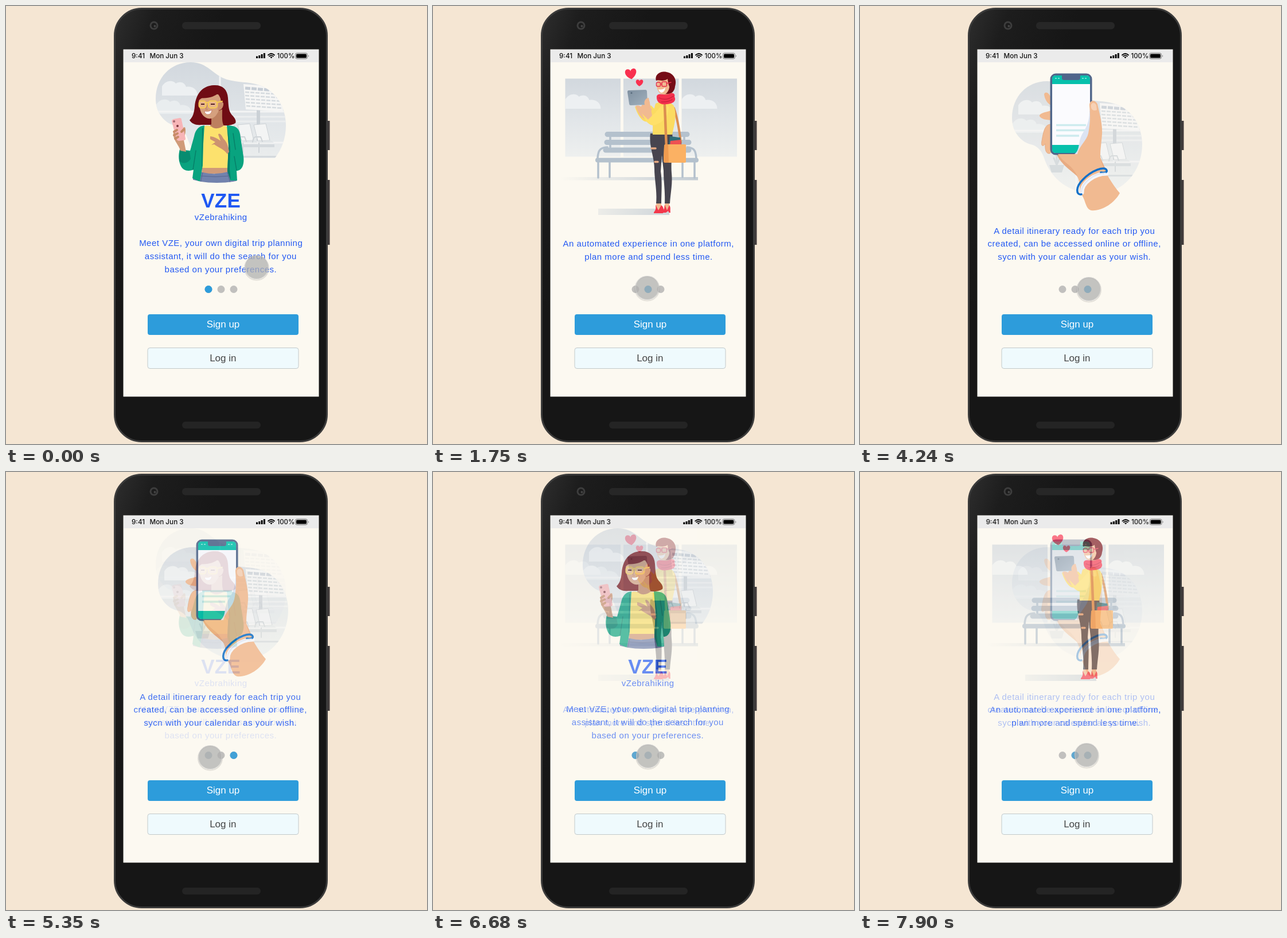
These frames come from a looping animation (734x763 px, 8 s). An HTML page:

```html
<!DOCTYPE html>
<html lang="en">
<head>
<meta charset="utf-8">
<title>Onboarding</title>
<style>
html, body { margin: 0; width: 100%; height: 100%; overflow: hidden; background: #f5e6d3; }
svg { display: block; width: 100%; height: 100%; }
text { font-family: "Liberation Sans", Arial, sans-serif; }
.copy { font-size: 15px; letter-spacing: .5px; fill: #2359f3; text-anchor: middle; }
.brand { font-size: 35px; font-weight: bold; letter-spacing: .3px; fill: #1f58f3; text-anchor: middle; }
.label { font-size: 17px; text-anchor: middle; }
.bar text { font: 450 11.7px Inter, sans-serif; fill: #111; }
.skin { fill: #d09a78; }
.peach { fill: #f1ba91; }
.line { fill: none; stroke-linecap: round; stroke-linejoin: round; }

#meet, #auto, #tip, #press { animation: 8s step-end infinite; }
#meet { animation-name: meet; }
#auto { animation-name: auto; }
#tip { animation-name: tip; }
#press { animation-name: press; }

@keyframes meet {
  0% { opacity: 1 }
  15.125% { opacity: .87 }
  16.625% { opacity: .65 }
  18% { opacity: .35 }
  19.375% { opacity: .12 }
  20.625% { opacity: .03 }
  21.875% { opacity: 0 }
  66.875% { opacity: .14 }
  68.25% { opacity: .4 }
  69.75% { opacity: .7 }
  71.25% { opacity: .94 }
  72.5% { opacity: .98 }
  73.75% { opacity: 1 }
  83.5% { opacity: .67 }
  85.25% { opacity: .35 }
  86.5% { opacity: .12 }
  87.75% { opacity: .03 }
  89% { opacity: 0 }
  100% { opacity: 0 }
}
@keyframes auto {
  0% { opacity: 1 }
  42.25% { opacity: .8 }
  43.875% { opacity: .4 }
  45.375% { opacity: .08 }
  47.75% { opacity: 0 }
  75% { opacity: 1 }
  96.875% { opacity: .88 }
  98.75%, 100% { opacity: .65 }
}
@keyframes tip {
  0% { transform: translate(437px, 455px) }
  1.25% { transform: translate(426px, 463px) }
  2.337% { transform: translate(402px, 481px) }
  3.412% { transform: translate(378px, 499px) }
  4.5% { transform: translate(371px, 505px) }
  6.625% { transform: translate(370px, 502px) }
  8.187% { transform: translate(372px, 494px) }
  9.75% { transform: translate(373.5px, 491px) }
  32.625% { transform: translate(387px, 491px) }
  34.125% { transform: translate(405px, 491.5px) }
  53% { transform: translate(399px, 493px) }
  54.5% { transform: translate(354px, 497px) }
  57.25% { transform: translate(356px, 497px) }
  73.75% { transform: translate(374px, 495px) }
  76.5% { transform: translate(375px, 495px) }
  90.125% { transform: translate(386px, 494px) }
  91.375%, 100% { transform: translate(395px, 493px) }
}
@keyframes press {
  0% { opacity: 0 }
  13.5% { opacity: 1 }
  15.125% { opacity: 0 }
  40.75% { opacity: 1 }
  42.25% { opacity: 0 }
  65.375% { opacity: 1 }
  66.875% { opacity: 0 }
  80.625% { opacity: 1 }
  81.75% { opacity: 0 }
  95.625% { opacity: 1 }
  96.875%, 100% { opacity: 0 }
}
</style>
</head>
<body>
<svg viewBox="0 0 734 763" preserveAspectRatio="none">
<defs>
  <linearGradient id="shell" x2=".7" y2=".5">
    <stop stop-color="#2e2e2e"/><stop offset=".18" stop-color="#1d1d1d"/><stop offset=".5" stop-color="#161616"/>
  </linearGradient>
  <linearGradient id="sky" x2="0" y2="1">
    <stop stop-color="#d2d8de"/><stop offset=".55" stop-color="#e2e6e9"/><stop offset="1" stop-color="#eef0ef"/>
  </linearGradient>
  <linearGradient id="shade">
    <stop stop-color="#c3ccd3" stop-opacity="0"/><stop offset="1" stop-color="#c3ccd3"/>
  </linearGradient>
  <linearGradient id="slate" x2="1" y2="1">
    <stop stop-color="#7f90a0"/><stop offset="1" stop-color="#a0b0bd"/>
  </linearGradient>

  <path id="blob" d="M261 162C261 125 287 98 322 98C352 98 360 120 385 128C405 134 420 131 442 138C470 148 488 175 488 208C488 255 455 294 408 294C360 294 330 268 318 235C312 215 303 210 290 207C272 200 261 182 261 162Z"/>
  <clipPath id="blobClip"><use href="#blob"/></clipPath>
  <clipPath id="upper"><path d="M200 76H545V265H200Z"/></clipPath>
  <clipPath id="round"><path d="M280 120H430V298Q365 318 310 298L280 298Z"/></clipPath>
  <clipPath id="screen"><path d="M205 76H545V680H205Z"/></clipPath>

  <path id="cloud" d="M0 30V14C6 4 18 2 24 9C32 4 40 8 42 15C52 13 62 19 62 30Z" fill="#edf0f2"/>
  <path id="heart" d="M0 9C-13 2 -11 -9 -5 -9C-2 -9 0 -7 0 -4.500C0 -7 3 -9 6 -9C12 -8 12 2 0 9Z" fill="#f9304f"/>

  <g id="seat">
    <path d="M0 0L21 -2L28 27L7 28Z" fill="#f3f4f4" stroke="#ccd1d5"/>
    <path d="M7 28L30 27L35 31H8Z" fill="#e2e6e8"/>
    <path class="line" d="M-2 30Q-1 20 5 21H12L15 29M9 32V48" stroke="#cfd4d8" stroke-width="2"/>
  </g>

  <g id="hall">
    <use href="#blob" fill="url(#sky)"/>
    <g clip-path="url(#blobClip)">
      <use href="#cloud" x="272" y="126"/>
      <use href="#cloud" x="262" y="158" opacity=".8"/>
      <path d="M369 110H373V290M260 184H490M380 238H490" fill="none" stroke="#f3f4f4" stroke-width="3"/>
      <path d="M374 193H490M374 201H490" stroke="#eceeef" stroke-width="3"/>
      <path d="M437 180H443V235H437Z" fill="#cbd1d6"/>
      <path d="M414 136L482 141L483 184L418 180Z" fill="#f6f6f5"/>
      <path d="M417 143L481 148" stroke="#c7ced6" stroke-width="5" stroke-dasharray="9 2"/>
      <path d="M417 150L481 154M417 156L482 160M418 162L482 166M418 168L482 172M419 174L482 178" stroke="#d5dade" stroke-width="2.500" stroke-dasharray="7 2"/>
      <use href="#seat" x="376" y="207"/>
      <use href="#seat" x="404" y="207"/>
      <use href="#seat" x="432" y="207"/>
      <path d="M388 241H468V246H388ZM392 261H480V264H392Z" fill="#d4d9dd"/>
      <path d="M326 244H352L348 257H330Z" fill="#cfd5da"/>
      <path class="line" d="M339 244L334 232M339 244L345 230M339 244V228" stroke="#cfd5da" stroke-width="3"/>
    </g>
  </g>

  <g id="bar" class="bar">
    <path d="M200 76H550V98H200Z" fill="#ebebeb"/>
    <text x="219" y="91">9:41</text>
    <text x="250.500" y="91">Mon Jun 3</text>
    <text x="472.500" y="91" style="font-size:11.4px">100%</text>
    <path d="M436 87.500H439V91H436ZM440.300 86H443.300V91H440.300ZM444.600 84H447.600V91H444.600ZM448.900 82H451.900V91H448.900Z" fill="#000"/>
    <path class="line" d="M457 85.500Q462.500 80.500 468 85.500M459 87.700Q462.500 84.500 466 87.700" stroke="#000" stroke-width="1.700"/>
    <path d="M460.500 89.200Q462.500 87.500 464.500 89.200L462.500 91.300Z"/>
    <rect x="504.500" y="82" width="21" height="10" rx="2.800" fill="none" stroke="#777"/>
    <rect x="506" y="83.500" width="18" height="7" rx="1.500"/>
    <path d="M527 85.200Q529 87 527 88.800Z" fill="#777"/>
  </g>

  <g id="dots" fill="#c1c0be">
    <circle cx="353" cy="493.500" r="6.500"/><circle cx="375" cy="493.500" r="6.500"/><circle cx="397" cy="493.500" r="6.500"/>
  </g>
  <circle id="on" cy="493.500" r="6.500" fill="#2d9cdb"/>
  <path id="paper" d="M205 76H545V680H205Z" fill="#fcf9f1"/>
</defs>

<path d="M0 0H734V763H0Z" fill="#f5e6d3"/>
<path d="M558 200H564.500V251H558ZM558 303H564.500V416H558Z" fill="#413b3b"/>
<rect x="189.500" y="4.500" width="370" height="754" rx="47" fill="url(#shell)" stroke="#3b3b3b" stroke-width="3"/>
<rect x="307" y="28" width="137" height="12.500" rx="6" fill="#272727"/>
<rect x="307" y="724" width="137" height="12" rx="6" fill="#242424"/>
<circle cx="258" cy="34" r="7.500" fill="#3d3d3d"/>
<circle cx="258" cy="34" r="4.500" fill="#1c1c1c"/>
<circle cx="259.500" cy="35" r="2" fill="#444"/>
<path d="M204.500 75.500H545.500V680.500H204.500Z" fill="#fcf9f1"/>

<g clip-path="url(#screen)">
  <g id="plan">
    <use href="#paper"/>
    <use href="#bar"/>
    <use href="#hall" transform="translate(4 33)" opacity=".8"/>
    <g class="peach">
      <path d="M336 174C328 172 322 163 321 154C322 149 328 150 331 156L337 163Z"/>
      <path d="M336 199C326 199 316 197 313 192C312 187 320 186 337 181Z"/>
      <path d="M336 206C325 205 321 210 317 235C315 244 319 246 323 240C322 252 325 258 331 257L337 250Z" stroke="#dfa27b" stroke-width=".7"/>
      <path d="M341 254C349 275 365 284 378 296C383 302 384 314 383 326L432 293L415 255Z" fill="#e8ab82"/>
    </g>
    <rect x="333.300" y="119.300" width="69.500" height="138.500" rx="8" fill="#fbfbfe" stroke="#50668a" stroke-width="3.500"/>
    <path d="M335 136V127Q335 121 341 121H395Q401 121 401 127V136ZM335 242H401V250Q401 256 395 256H341Q335 256 335 250Z" fill="#07c0ac"/>
    <path d="M352 120H384V126Q384 129 380 129H356Q352 129 352 126Z" fill="#50668a"/>
    <path d="M340 126H349M387 126H397" stroke="#72e0d3" stroke-width="2" stroke-dasharray="3 2"/>
    <path d="M342 207.500H394M342 216.500H393M342 226H382" stroke="#cdebee" stroke-width="3.500"/>
    <path d="M400 178C401 205 392 215 386 226C380 238 384 250 374 258H392L408 220Z" fill="#dce4f3"/>
    <path class="peach" d="M400 174C399 164 410 162 414 171C417 185 423 205 422 223C420 249 417 261 421 272C427 290 441 312 453 326C443 344 421 358 403 356C392 353 394 336 384 326C385 305 379 288 359 273C352 267 348 262 345 258H379C382 244 395 235 398 222C401 207 402 190 400 174Z"/>
    <path d="M403 177C401 168 409 166 412 173L413 181C409 183 404 182 403 177Z" fill="#f7d1b5"/>
    <g class="line" stroke-width="3.500">
      <path d="M387 325C386 309 408 292 430 292" stroke="#f4f6fb" stroke-width="7"/>
      <path d="M386 328C376 330 376 315 388 303C404 286 427 278 430 286C432 290 426 291 420 290" stroke="#1270c8"/>
      <path d="M386 324C386 309 407 291 428 291" stroke="#dfe7f5" stroke-width="2"/>
    </g>
    <g class="copy">
      <text x="373.700" y="397">A detail itinerary ready for each trip you</text>
      <text x="373.700" y="419">created, can be accessed online or offline,</text>
      <text x="373.700" y="442">sycn with your calendar as your wish.</text>
    </g>
    <use href="#dots"/><use href="#on" x="397"/>
  </g>

  <g id="auto">
    <use href="#paper"/>
    <use href="#bar" x="1"/>
    <path d="M230.500 126.500H327V262.500H230.500ZM332 126.500H428.500V262.500H332ZM433.500 126.500H530V262.500H433.500Z" fill="url(#sky)"/>
    <use href="#cloud" x="230.500" y="149"/>
    <use href="#cloud" x="433.500" y="149"/>
    <path d="M222 298H462V303.500H222ZM288 353H412V364H288Z" fill="url(#shade)"/>
    <g class="line" stroke="#b4c1cd">
      <path d="M304 223.500H443M303 237.500H446M301 251H446" stroke-width="9"/>
      <path d="M287 268.500H459" stroke-width="8"/>
      <path d="M288 271V299M308 271V298M435 271V298M456 271V299M287 265C288 250 292 247 304 246M459 265C458 250 454 247 443 246M309 226V246M438 226V246" stroke-width="3.500"/>
    </g>
    <use href="#heart" transform="translate(345 118.500) rotate(-8)"/>
    <use href="#heart" transform="translate(360 134) scale(.64)"/>
    <path class="peach" d="M390 343L388 350L392 359L398 352V343ZM405 343L403 350L407 359L412 352V343Z"/>
    <path d="M388 346L393 356L398 347C402 350 403 355 401 361H385C385 357 390 357 388 346ZM404 346L408 356L412 347C415 351 413 355 414 360H411.500L410 357L406 360H399C399 357 404 357 404 346Z" fill="#f3384b"/>
    <path d="M379 222H417C420 240 414 270 416 291C418 310 414 325 413 344H404C405 322 402 307 402 287L399 260L397 288C400 307 398 327 398 344H389C391 322 386 302 386 284C386 262 376 244 379 222Z" fill="#47454f"/>
    <path class="line" d="M381 248H388M387 271.500H392" stroke="#e5a982" stroke-width="3.500"/>
    <path class="line" d="M420 178C426 195 429 212 432 238" stroke="#dc8e50" stroke-width="4"/>
    <path d="M388 170C396 165 414 165 420 174C425 188 422 202 417 224H383C384 207 381 192 388 170Z" fill="#fbdb61"/>
    <path d="M352 175C359 178 365 181 369 186L380 173L390 183L374 201C367 204 357 192 352 175Z" fill="#fbdb61"/>
    <path class="peach" d="M353 174C360 171 368 178 369 184L376 174L382 180L371 198C362 195 357 185 353 174Z"/>
    <path d="M411 176C412 191 399 206 383 208C373 206 368 196 363 184L371 178L382 190C390 187 394 174 404 171Z" fill="#ffe069"/>
    <path class="peach" d="M362 185C360 175 367 169 372 161C377 161 378 168 379 174L382 191L375 198Z"/>
    <path d="M341 147L370 146Q373 146 373 149L374 169Q374 172 371 172L345 173Q342 173 342 170L339 150Q339 147 341 147Z" fill="url(#slate)"/>
    <circle cx="346" cy="151.500" r="1.500" fill="#596c7e"/>
    <path class="peach" d="M369 172C367 166 371 160 376 160L378 169L374 177Z"/>
    <path class="line" d="M404 173L407 248" stroke="#dc8e50" stroke-width="4.500"/>
    <path d="M413 227L431 229L434 244H411Z" fill="#2f6d78"/>
    <path d="M414 235L432 233L433 243H413Z" fill="#ee5152"/>
    <path d="M403 244Q403 241 406 241H439Q442 241 441 245V271Q441 273 438 273H405Q402 273 402 269Z" fill="#fbb163"/>
    <path d="M403 244Q403 241 406 241H410L411 273H405Q402 273 402 269Z" fill="#ef9b4f"/>
    <path d="M404 149L418 148L415 160L402 161Z" fill="#d98e69"/>
    <path d="M389 130C386 119 397 113 407 115C420 117 426 129 422 140C421 150 415 154 405 153L397 128Z" fill="#760d17"/>
    <path class="peach" d="M392 128C399 129 405 126 410 124C415 134 413 150 404 154C396 155 391 149 390 139Z"/>
    <path d="M391 129C397 118 408 118 413 128L416 145C411 142 410 134 409 127C403 131 398 130 391 129Z" fill="#760d17"/>
    <path d="M393 145Q400 147 405 142Q404 150 399 151Q395 151 393 145Z" fill="#fff"/>
    <g class="line" stroke="#e6314c" stroke-width="1.500">
      <rect x="389.500" y="133" width="7" height="7" rx="2"/><rect x="399" y="132" width="8.500" height="8" rx="2"/><path d="M396.500 136H399M407 135L415 133"/>
    </g>
    <path d="M390 157C393 150 402 156 410 154C418 149 423 153 421 158C425 166 418 170 408 171C397 173 389 168 390 157Z" fill="#f4314d"/>
    <path class="line" d="M394 160Q406 166 419 157M398 167Q409 168 417 163" stroke="#c91f3b" stroke-width="1.200"/>
    <g class="copy">
      <text x="375.700" y="419">An automated experience in one platform,</text>
      <text x="376" y="442">plan more and spend less time.</text>
    </g>
    <use href="#dots"/><use href="#on" x="375"/>
  </g>

  <g id="meet">
    <use href="#paper"/>
    <use href="#bar"/>
    <g clip-path="url(#upper)"><use href="#hall"/></g>
    <g clip-path="url(#round)">
      <path d="M362 138C377 137 386 145 387 160C388 175 388 183 394 190C399 195 402 200 400 204C392 209 381 209 372 207L340 207C331 208 324 205 320 199C326 193 328 186 329 175C331 152 343 139 362 138Z" fill="#700c14"/>
      <path d="M358 188L377 180C377 192 376 202 380 209C380 221 368 224 360 219C354 215 354 209 358 206Z" fill="#bd805f"/>
      <path d="M345 210C351 207 356 208 361 212C368 215 375 212 380 208L387 211L388 284H342Z" fill="#fce16d"/>
      <path class="skin" d="M342 282H388V292H341Z"/>
      <path d="M326 297C332 288 338 289 344 290Q365 295 386 289C395 288 400 292 402 299V312H326Z" fill="#7282ad"/>
      <path d="M343 290L339 308M386 290L391 308M340 296Q365 299 390 296" fill="none" stroke="#56658f"/>
      <path d="M346 208C336 209 330 216 328 227L321 252L303 250C300 260 301 271 305 279C309 287 318 289 327 285L325 300L338 306L343 278L344 240Z" fill="#09a37f"/>
      <path d="M385 208C398 208 406 211 408 223L414 262C416 277 411 287 402 287L403 304L391 304L386 286L388 241Z" fill="#09a37f"/>
      <path d="M344 212L342 278L337 305L341 283L342 213ZM386 211L388 245L386 288L392 304L390 284L391 246Z" fill="#057d68"/>
      <path class="line" d="M326 285L331 252M402 286L398 262M396 222L400 250" stroke="#067f68" stroke-width="1.500"/>
      <path d="M303 250L320 254L322 266C318 274 308 276 302 270Z" fill="#078c70"/>
    </g>
    <path class="skin" d="M304 252C302 243 292 234 292 225C291 215 296 211 300 214L312 211C315 218 311 226 310 234L314 254Z"/>
    <path d="M292 197L303 195Q306 195 306 198L313 231Q313 234 310 234L301 235Q298 234 297 231L289 201Q289 198 292 197Z" fill="#f7b5b7"/>
    <circle cx="293" cy="201" r="2" fill="#a36670"/>
    <circle cx="299" cy="209" r="2" fill="#7b343d"/>
    <path class="line" d="M293 219L298 216M293 225L299 222M295 231L300 228M310 215L306 219" stroke="#c88b68" stroke-width="4"/>
    <path d="M356 227C364 228 369 231 374 235L370 224C372 220 376 225 379 231C386 237 388 247 389 254L386 258C380 249 369 246 363 241L358 242L365 237L356 232Z" fill="#cc9270"/>
    <path d="M337 160C351 162 364 158 371 151C378 163 374 182 365 192C357 200 345 196 340 185C337 177 335 168 337 160Z" fill="#d5a07e"/>
    <path d="M371 167C375 163 380 166 379 172C378 179 373 183 369 181Z" fill="#cb8e6d"/>
    <path d="M334 166C336 149 356 141 371 147C380 151 382 162 380 170C375 166 374 159 370 154C360 153 347 154 334 166Z" fill="#700c14"/>
    <g class="line" stroke="#f7cd52" stroke-width="2">
      <rect x="336.500" y="165.500" width="12" height="12" rx="4" fill="#e8b68b"/><rect x="353" y="165.500" width="15" height="12" rx="4" fill="#e8b68b"/><path d="M349 169Q351 167 353 169M368 168L377 166"/>
    </g>
    <path d="M340 171H346M357 171H364" stroke="#542129" stroke-width="2"/>
    <path d="M351 173L348 180H352" fill="none" stroke="#b87961"/>
    <path d="M346 183Q353 185 359 181Q358 189 352 189Q347 189 346 183Z" fill="#fff" stroke="#b85951" stroke-width=".6"/>
    <text class="brand" x="374.700" y="351">VZE</text>
    <g class="copy">
      <text x="374.700" y="373">vZebrahiking</text>
      <text x="374.700" y="418">Meet VZE, your own digital trip planning</text>
      <text x="374.400" y="441">assistant, it will do the search for you</text>
      <text x="374.400" y="464">based on your preferences.</text>
    </g>
    <use href="#dots"/><use href="#on" x="353"/>
  </g>

  <rect x="247" y="537" width="263" height="36" rx="4" fill="#2d9cdb"/>
  <rect x="247" y="595.500" width="263" height="36" rx="4" fill="#effafd" stroke="#c2c9ca"/>
  <text class="label" x="378.500" y="560" fill="#fff">Sign up</text>
  <text class="label" x="378.300" y="619" fill="#444">Log in</text>
</g>

<g id="tip">
  <circle cy="1.500" r="21" fill="none" stroke="#000" stroke-opacity=".1" stroke-width="2"/>
  <circle r="21" fill="#b1b1af" fill-opacity=".75"/>
  <circle r="20.500" fill="none" stroke="#fff" stroke-opacity=".5" stroke-width=".8"/>
  <g id="press">
    <circle r="21" fill="#bdbab8" fill-opacity=".7"/>
    <circle r="14.500" fill="#dedf58" fill-opacity=".93"/>
  </g>
</g>
</svg>
</body>
</html>
```
